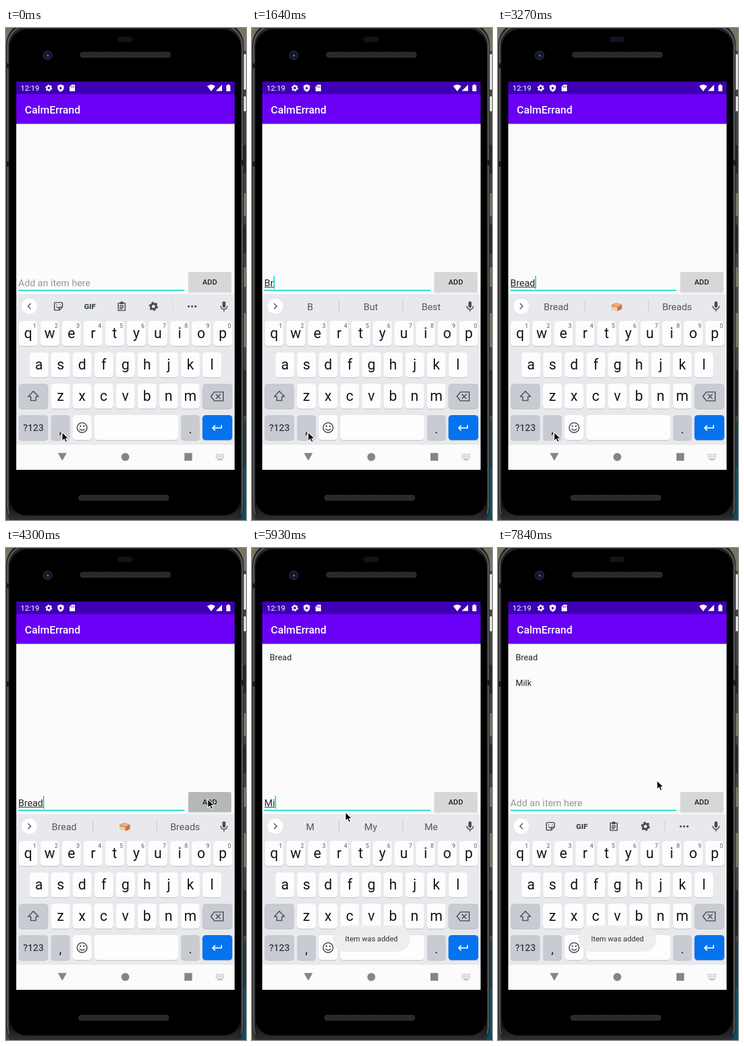
These frames come from a looping animation (421x863 px, 7.99 s). An HTML page:

```html
<!DOCTYPE html>
<html lang="en">
<head>
<meta charset="utf-8">
<title>Todo list demo</title>
<style>
html, body { margin: 0; width: 100%; height: 100%; overflow: hidden; background: #000; }
svg { display: block; width: 100%; height: 100%; }
text { font-family: Roboto, sans-serif; white-space: pre; }
.mid { text-anchor: middle; }
.line { fill: none; stroke: #484b50; stroke-width: 1.7; stroke-linejoin: round; stroke-linecap: round; }
</style>
</head>
<body>
<svg viewBox="0 0 421 863" preserveAspectRatio="none">
  <defs>
    <pattern id="mesh" width="4" height="4" patternUnits="userSpaceOnUse">
      <rect width="4" height="4" fill="#1d1d1d"/>
      <path d="M0 0l4 4M4 0l-4 4" stroke="#3b3b3b" stroke-width=".8"/>
    </pattern>
    <linearGradient id="shade" x2="0" y2="1">
      <stop offset="0" stop-color="#dadada"/><stop offset="1" stop-color="#fbfbfb"/>
    </linearGradient>
    <linearGradient id="base" x2="0" y2="1">
      <stop offset="0" stop-color="#000"/><stop offset="1" stop-color="#303032"/>
    </linearGradient>
    <g id="gear">
      <circle r="4.1" fill="none" stroke="currentColor" stroke-width="3"/>
      <circle r="6" fill="none" stroke="currentColor" stroke-width="2.2" stroke-dasharray="3.14 3.143"/>
    </g>
  </defs>

  <!-- wallpaper -->
  <rect width="421" height="863" fill="#45423a"/>
  <path d="M0 0h30v26h-30zM390 0h31v40h-31zM414 290h7v40h-7zM414 420h7v34h-7zM414 500h7v60h-7z" fill="#7a735f"/>
  <path d="M414 205h7v50h-7zM414 345h7v50h-7zM414 600h7v80h-7z" fill="#25261f"/>
  <path d="M417 46h4v62h-4zM417 120h4v26h-4z" fill="#dedede"/>
  <path d="M400 690h21v80h-21z" fill="#1b3a43"/>
  <path d="M400 770h21v93h-21z" fill="#0b4f62"/>

  <!-- phone body -->
  <rect x=".5" y="-10" width="416.500" height="888" rx="38" fill="#262628"/>
  <rect x="3" y="-4" width="411.500" height="878" rx="35" fill="none" stroke="#5f6062" stroke-width="2"/>
  <rect x="6" y="2" width="406" height="858" rx="32"/>
  <path d="M6 818q1 36 30 37h346q29-1 30-37v45h-406z" fill="url(#base)"/>
  <path d="M1 62h5v9H1zM1 234h5v9H1zM413 232h4v9h-4z" fill="#19191b"/>
  <rect x="196" y="15" width="26" height="10" rx="4" fill="#10131c"/>
  <circle cx="73" cy="48" r="8.5" fill="#222428"/>
  <circle cx="73" cy="48" r="5.8" fill="#0d1126"/>
  <circle cx="73.500" cy="48.500" r="2.800" fill="#243a78"/>
  <circle cx="73" cy="47.500" r="1" fill="#8495c4"/>
  <rect x="130.5" y="42.5" width="158" height="9" rx="4" fill="url(#mesh)" stroke="#333"/>
  <rect x="127.5" y="819.5" width="158" height="9" rx="4" fill="url(#mesh)" stroke="#333"/>

  <!-- app -->
  <rect x="18" y="94" width="383" height="681" fill="#fbfbfb"/>
  <rect x="18" y="168" width="383" height="3" fill="url(#shade)"/>
  <rect x="18" y="94" width="383" height="22.5" fill="#3f00b4"/>
  <rect x="18" y="116" width="383" height="52" fill="#6a00f6"/>
  <g fill="#fff" color="#fff">
    <text x="25.5" y="110" font-size="13.2">12:19</text>
    <use href="#gear" transform="translate(75 105.3) scale(.84)"/>
    <path d="M96 99l5.5 2v4c0 3.300-2.300 5.800-5.500 7c-3.200-1.200-5.500-3.700-5.500-7v-4z"/>
    <path d="M94.300 102.500l4.500 3l-4.500 3z" fill="#3f00b4"/>
    <path d="M115 99.500h6v11.500h-9.500v-8z"/>
    <path d="M114.500 102v2.500M116.800 102v2.500M119 102v2.500" stroke="#3f00b4"/>
    <path d="M353 102q7-5.500 14 0l-7 9z"/>
    <path d="M379 99.500v11h-11z"/>
    <path d="M388.500 100.500v-1.500h3v1.500h2v10.500h-7v-10.500z"/>
    <text x="33" y="149.500" font-size="18.600" font-weight="500">CalmErrand</text>
  </g>
  <g font-size="14.900" fill="#242424">
    <text id="item1" x="31" y="196.500">Bread</text>
    <text id="item2" x="31" y="241.500">Milk</text>
  </g>

  <!-- entry row -->
  <text id="hint" x="21.500" y="452.500" font-size="16.800" fill="#979797">Add an item here</text>
  <text id="entry" x="21.500" y="452.500" font-size="16.800" fill="#242424"></text>
  <rect id="compose" x="22" y="454" height="1.200" fill="#333"/>
  <rect x="21.500" y="459.300" width="291.500" height="2" fill="#12d8c6"/>
  <rect id="caret" y="435" width="2" height="22.500" fill="#12d8c6"/>
  <rect x="319.500" y="429.500" width="76" height="35" rx="2" fill="#000" opacity=".14"/>
  <rect id="button" x="320" y="428" width="75" height="35" rx="2"/>
  <text class="mid" x="357.300" y="450.300" font-size="13.050" font-weight="500" fill="#222">ADD</text>

  <!-- keyboard -->
  <rect x="18" y="466.500" width="383" height="264.500" fill="#e8e9ed"/>
  <circle cx="41" cy="488" r="14" fill="#fff" stroke="#dcdde1" stroke-width=".6"/>
  <path id="chevron" class="line"/>
  <g id="tools" color="#484b50">
    <path class="line" d="M87 481.500h10q2 0 2 2v6l-5.500 5.500h-6.500q-2 0-2-2v-9.500q0-2 2-2zM99 489.500h-3.500q-2 0-2 2v3.500M89 489q2.500 3.500 5 .5M89 485.500h.2M95 485.500h.2"/>
    <text class="mid" x="147" y="492.700" font-size="13.200" font-weight="900" fill="#484b50">GIF</text>
    <path class="line" d="M197 482.500h12v13h-12zM200 487h6M200 489.700h6M200 492.400h4"/>
    <path d="M200 480.500h1.500q1.500-2 3 0h1.500v4h-6z" fill="#484b50"/>
    <use href="#gear" transform="translate(258.700 488.300) scale(1.120)"/>
    <path d="M292.500 478v20" stroke="#cfd1d6"/>
    <path d="M320.500 488.300h.01M326.500 488.300h.01M332.500 488.300h.01" class="line" style="stroke-width:3.800"/>
  </g>
  <g id="words" font-size="16.800" fill="#54575c">
    <path d="M152.500 477v22M264.500 477v22" stroke="#c4c6cb"/>
    <text class="mid" x="102" y="494.500"></text>
    <text class="mid" x="208.300" y="494.500"></text>
    <text class="mid" x="314.200" y="494.500"></text>
  </g>
  <g id="loaf">
    <path d="M199 487q0-2 3-3l4-1.500q2-.7 4 0l6 2q2.500 1 2 3.500l-1 5.500l-7 3l-10-3z" fill="#d98a50"/>
    <path d="M200 486.500l7-3.500q2-.7 4 0l5 2l-6 3.500z" fill="#e9b285"/>
    <path d="M199.500 488.500l9.500 1.500v6l-8.500-2.500z" fill="#f1cfa9"/>
    <path d="M210 490l7-3l-1 6l-6 3z" fill="#c9713f"/>
  </g>
  <path id="glass" d="M204 480h8.500v4l-1 12h-6.500l-1-12z" fill="#f0f1f3" stroke="#d8dade" stroke-width=".8"/>
  <rect x="379.700" y="479.500" width="5.400" height="11" rx="2.700" fill="#484b50"/>
  <path class="line" d="M376.800 488q.5 5.300 5.600 5.300t5.600-5.300M382.400 493.500v3"/>
  <g id="keys"></g>
  <path class="line" d="M48 637l-9 9.500h4.500v7h9v-7h4.500z"/>
  <path class="line" d="M365.500 638.500h15.500v15.500h-15.500l-6-7.750zM368.500 642.700l7.300 7.300M375.800 642.700l-7.300 7.300"/>
  <circle class="line" cx="133.500" cy="701" r="8.700"/>
  <path class="line" d="M129.300 703.300q4.200 4.800 8.400 0"/>
  <circle cx="130.500" cy="698.500" r="1.400" fill="#484b50"/>
  <circle cx="136.500" cy="698.500" r="1.400" fill="#484b50"/>
  <path d="M378 696.500v5h-15M367 697l-4.500 4.500l4.500 4.500" fill="none" stroke="#fff" stroke-width="1.900"/>

  <!-- navigation bar -->
  <g fill="#858585">
    <path d="M91 745.500h15.500l-7.750 13.500z"/>
    <circle cx="209.300" cy="752.500" r="7"/>
    <rect x="313" y="745.500" width="13.500" height="13.500"/>
  </g>
  <path d="M368 748h15M368 751h15M368 754h15" stroke="#999" stroke-width="1.700" stroke-dasharray="1.700 1.500"/>
  <path d="M371 757h9" stroke="#999" stroke-width="1.500"/>

  <g id="toast">
    <rect x="141" y="662" width="137" height="46" rx="23" fill="#eeeeef" opacity=".95"/>
    <text class="mid" x="209.500" y="690.300" font-size="13.050" fill="#333">Item was added</text>
  </g>
  <path id="pointer" d="M0 0v15.200l3.600-3.300l2.400 5.600l2.700-1.200l-2.400-5.300h5z" fill="#000" stroke="#fff" stroke-width="1.100"/>
</svg>
<script>
const LOOP = 7990;
const $ = id => document.getElementById(id);

function add(tag, attrs, text = '') {
  const el = document.createElementNS('http://www.w3.org/2000/svg', tag);
  for (const k in attrs) el.setAttribute(k, attrs[k]);
  el.textContent = text;
  $('keys').append(el);
}

function key(x, y, w, fill, label = '', size = 25, base = 30.3) {
  const box = { x, width: w, height: 43.8, rx: 5.5 };
  add('rect', { ...box, y: y + 1.1, fill: '#bfc1c6' });
  add('rect', { ...box, y, fill });
  if (label) add('text', { class: 'mid', x: x + w / 2, y: y + base, 'font-size': size, fill: '#151618' }, label);
}

const PALE = '#fdfdfd', GREY = '#c9cbd3';
['qwertyuiop', 'asdfghjkl', 'zxcvbnm'].forEach((row, r) => {
  [...row].forEach((c, i) => {
    const x = [22.3, 41.2, 79][r] + i * 37.95, y = 514 + r * 55;
    key(x, y, 33, PALE, c);
    if (!r) add('text', { class: 'mid', x: x + 28, y: 525.5, 'font-size': 10.5, fill: '#5c5f64' }, (i + 1) % 10);
  });
});
key(22.3, 624, 51.7, GREY);
key(344.6, 624, 52.4, GREY);
key(22.3, 679, 51.7, GREY);
add('text', { class: 'mid', x: 48, y: 707, 'font-size': 16.5, 'font-weight': 500, fill: '#3c3f44' }, '?123');
key(79, 679, 33, GREY, ',', 22, 32);
key(117, 679, 33, PALE);
key(155, 679, 147, PALE);
key(307, 679, 33, GREY, '.', 22, 32);
key(344.6, 679, 52.4, '#0673ee');

// Each track lists [start ms, value]; values hold until the next start.
const typed = [[0, ''], [900, 'B'], [1640, 'Br'], [1940, 'Bre'], [2530, 'Brea'], [2980, 'Bread'], [4450, ''],
  [5630, 'M'], [5930, 'Mi'], [6230, 'Mil'], [6520, 'Milk'], [7550, '']];
const offers = [[0, ''], [1050, 'B But Best'], [1790, 'Br Bro Bring'], [2090, 'Bre Bread Breakfast'],
  [2830, 'Brea Bread Break'], [3130, 'Bread * Breads'], [4450, ''], [5780, 'M My Me'], [6080, 'Mi Mid Mix'],
  [6520, 'Mil Milk Mill'], [6670, 'Milk * Mill'], [7550, '']];
const caretOn = [[0, 0], [300, 1], [750, 0], [900, 1], [3570, 0], [4010, 1], [4450, 0], [5340, 1], [7110, 0]];
const pressed = [[0, 0], [4010, 1], [4450, 0], [7400, 1], [7550, 0]];
const toastOn = [[0, 0], [4600, 1], [6670, 0], [7690, 1]];
const mouse = [[0, [98.5, 709]], [3420, [140, 672]], [3570, [240, 565]], [3720, [330, 468]], [3860, [354, 440.5]],
  [4600, [338, 443]], [4750, [270, 452]], [4890, [196, 460]], [5040, [164, 463.5]],
  [6670, [205, 460]], [6820, [290, 450]], [6960, [345, 443]], [7110, [352.5, 441.5]],
  [7690, [330, 430]], [7840, [279, 408]]];

const at = (track, t) => track.findLast(step => step[0] <= t)[1];
const show = (id, on) => $(id).setAttribute('visibility', on ? 'visible' : 'hidden');
const slots = $('words').querySelectorAll('text');

function draw(t) {
  const text = at(typed, t), offer = at(offers, t), words = offer.split(' ');
  $('entry').textContent = text;
  const width = text ? $('entry').getComputedTextLength() : 0;
  $('compose').setAttribute('width', width);
  $('caret').setAttribute('x', 21.5 + width);
  show('hint', !text);
  show('caret', at(caretOn, t));
  show('item1', t >= 4450);
  show('item2', t >= 7550);
  show('tools', !offer);
  show('words', offer);
  slots.forEach((el, i) => el.textContent = (words[i] || '').replace('*', ''));
  show('loaf', offer.includes('* B'));
  show('glass', offer.includes('* M'));
  $('chevron').setAttribute('d', offer ? 'M39 483.5l4.500 4.500l-4.500 4.500' : 'M43 483.500l-4.500 4.500l4.500 4.500');
  $('button').setAttribute('fill', at(pressed, t) ? '#b4b8b6' : '#d6d7d7');
  show('toast', at(toastOn, t));
  $('pointer').setAttribute('transform', `translate(${at(mouse, t)})`);
}

const start = performance.now();
function tick() {
  draw((performance.now() - start) % LOOP);
  requestAnimationFrame(tick);
}
tick();
</script>
</body>
</html>
```
